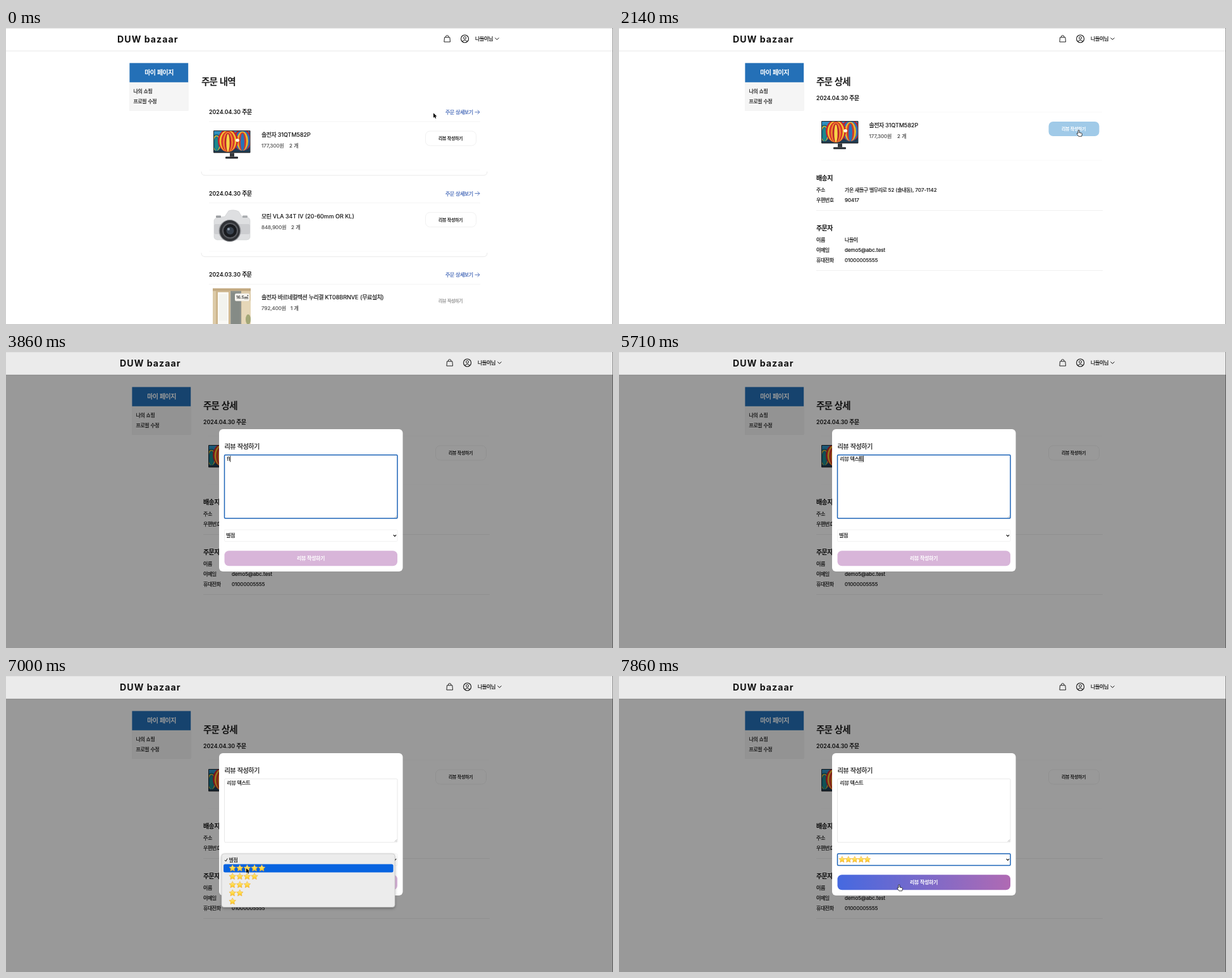
Recreate the animation shown at these times as an HTML page. Size 960 by 468 pixels, loop 8 s.

```html
<!DOCTYPE html>
<html lang="ko">
<head>
<meta charset="utf-8">
<style>
html, body { margin: 0; width: 100%; height: 100%; overflow: hidden; background: #fff; }
svg { display: block; width: 960px; height: 468px; }
text { font-family: Inter, "Noto Sans CJK KR", "Noto Sans CJK JP", "Noto Sans CJK", sans-serif; white-space: pre; }
tspan { letter-spacing: -.06em; }
</style>
</head>
<body>
<svg id="stage" viewBox="0 0 960 468" xmlns="http://www.w3.org/2000/svg"></svg>
<script>
const stage = document.getElementById('stage');

// Hangul runs are set a little tighter than Latin ones.
const hangul = s => s.replace(/[ㄱ-힣]+/g, '<tspan>$&</tspan>');
// A hairline stroke thickens the regular weight to a medium one.
const text = (x, y, s, size = 8, weight = 400, fill = '#111', extra = '') =>
  `<text x="${x}" y="${y}" font-size="${size}" font-weight="${weight}" fill="${fill}" ${extra}
    ${weight < 600 ? `stroke="${fill}" stroke-width=".2"` : ''}>${hangul(s)}</text>`;
const mid = (x, y, s, size, weight, fill) => text(x, y, s, size, weight, fill, 'text-anchor="middle"');
const rect = (x, y, w, h, fill, r = 0, extra = '') =>
  `<rect x="${x}" y="${y}" width="${w}" height="${h}" rx="${r}" fill="${fill}" ${extra}/>`;
const path = (d, stroke = '#111', width = 1, extra = 'fill="none"') =>
  `<path d="${d}" stroke="${stroke}" stroke-width="${width}" ${extra}/>`;
const oval = (x, y, rx, ry, fill) => `<ellipse cx="${x}" cy="${y}" rx="${rx}" ry="${ry}" fill="${fill}"/>`;
const group = (id, body, extra = '') => `<g id="${id}" ${extra}>${body}</g>`;
const at = (x, y, body) => `<g transform="translate(${x} ${y})">${body}</g>`;
const rule = (x, y, w, color = '#f0f0f0') => rect(x, y, w, 1, color);

function star(x, y, r) {
  const points = Array.from({ length: 10 }, (_, i) => {
    const a = i * Math.PI / 5, d = i % 2 ? r * .5 : r;
    return (x + d * Math.sin(a)).toFixed(2) + ',' + (y - d * Math.cos(a)).toFixed(2);
  });
  return `<polygon points="${points.join(' ')}" fill="url(#gold)" stroke="#efab2e" stroke-width=".6" stroke-linejoin="round"/>`;
}
const stars = (n, x, y, gap, r) => Array.from({ length: n }, (_, i) => star(x + i * gap, y, r)).join('');

// Nested ovals share their lowest point, so the stripes fan out upwards.
function balloon(x, y, rx, ry, colors) {
  return colors.map((c, i) => {
    const k = 1 - i / colors.length;
    return oval(x, y + ry * (1 - k) * .25, rx * k, ry * (.75 + k * .25), c);
  }).join('');
}

const monitor =
  rect(0, 0, 58.5, 35.5, '#20252b', 1) +
  '<g clip-path="url(#screen)">' + rect(1, 1, 56.5, 32.5, '#2f8fc0') + rect(1, 26, 56.5, 8, '#1c3d55') +
  balloon(5, 19, 9, 13, ['#14647a', '#d9b72f', '#17748f', '#1b8a8a']) +
  balloon(46, 15, 15, 17, ['#b9252f', '#2b6fb8', '#e9b92b', '#cf3a2c', '#2674b9']) +
  balloon(23, 16, 16, 18, ['#c9252c', '#f4c531', '#d9342b', '#f08b2c', '#b91f2e', '#f7d447']) +
  oval(38, 15.5, 3, 2.5, '#fff8e0') + '</g>' +
  rect(26, 35.5, 7, 6, '#34383d') + rect(19, 41.5, 20, 3, '#22262b', 1);

const camera =
  path('M1 16Q2 12 8 11.5L18 10L24 1Q32-2 40 2L45 10L54 11.5Q58 12 58 17V43Q57 47 52 47H6Q1 46 1 42Z', '#c4c6c8', .5, 'fill="#dedfe1"') +
  rect(1, 22, 57, 16, '#cccdd0', 3) + rect(4, 8.5, 8, 3.5, '#9b9ea1', 1) + rect(46, 8.5, 8, 3.5, '#a9acaf', 1) +
  oval(26, 32.5, 17.5, 17.5, '#909296') + oval(26, 32.5, 16, 16.5, '#303236') +
  oval(26.5, 32.5, 12.5, 12.5, '#595b60') + oval(26.5, 32.5, 10.5, 10.5, '#191b1f') +
  oval(26.5, 32.5, 6, 6, '#37404c') + oval(24, 30, 2, 2, '#8b98a8');

const room =
  rect(0, 0, 60, 57, '#dccaa8') + rect(0, 0, 60, 4, '#c2a981') + rect(5, 4, 22, 53, '#cdb58c') +
  rect(8, 6, 17, 51, '#faf9f5') + rect(10, 9, 13, 42, '#f2f3ee') +
  rect(28, 4, 17, 53, '#8d928c') + rect(30, 7, 13, 50, '#858b86') +
  rect(46, 20, 14, 37, '#e6d7b8') + oval(56, 49, 4, 8, '#a3a777') +
  rect(35, 8, 23, 12, '#f6f4ee', 2) + mid(46.5, 16.6, '16.5㎡', 6.6, 600, '#333');

const arrowRight = (x, y) => path(`M${x} ${y}h7.5m-3.2-3.2l3.2 3.2l-3.2 3.2`, '#4266b5', .9);
const button = (x, y, id = '') =>
  rect(x, y, 80, 23, '#fff', 7, `stroke="#ededed" stroke-width=".8" ${id && `id="${id}"`}`);

function card(y, name, price, count, countX, picture, done) {
  return at(0, y,
    text(321, 136, y < 200 ? '2024.04.30 주문' : '2024.03.30 주문', 8.8, 600) +
    text(695, 136, '주문 상세보기', 8, 400, '#3b60b4') + arrowRight(741.5, 133) +
    rule(321, 147.5, 429, '#f4f4f4') + rule(321, 224, 429, '#f9f9f9') +
    path('M309 227q0 6 6 6h440q6 0 6-6', '#eaeaea') + picture +
    text(404, 172.3, name, 9) + text(404, 189, price, 8, 400, '#555') + text(countX, 189, count, 8, 400, '#444') +
    (done ? '' : button(663.5, 163)) +
    mid(703, 177, '리뷰 작성하기', 7, done ? 400 : 600, done ? '#888' : '#222'));
}

const listPage =
  text(309, 90, '주문 내역', 14.6, 600, '#222') +
  card(0, '솔전자 31QTM582P', '177,300원', '2 개', 448, at(328, 162, monitor)) +
  card(128.6, '모린 VLA 34T IV (20-60mm OR KL)', '848,900원', '2 개', 451, at(328, 159.5, camera)) +
  card(257.2, '솔전자 바르네컬렉션 누리결 KT08BRNVE (무료설치)', '792,400원', '1 개', 450, at(327, 154.5, room), true);

const row = (y, label, value) => text(312, y, label) + text(357, y, value);
const detailPage =
  text(312, 90, '주문 상세', 14.6, 600, '#222') + text(312, 114, '2024.04.30 주문', 8.8, 600) +
  rule(320, 132.5, 444, '#f9f9f9') + at(320, 147, monitor) +
  text(395.5, 157.2, '솔전자 31QTM582P', 9) + text(395.5, 174, '177,300원', 8, 400, '#555') +
  text(440, 174, '2 개', 8, 400, '#444') +
  button(679.5, 148, 'review') + '<g id="reviewLabel">' + mid(719, 162, '리뷰 작성하기', 7, 600, 'inherit') + '</g>' +
  rule(320, 208.5, 444, '#f9f9f9') +
  text(312, 240.5, '배송지', 10, 600) +
  row(258.8, '주소', '가온 새들구 별무리로 52 (솔내동), 707-1142') + row(275, '우편번호', '90417') +
  rule(312, 288, 453) +
  text(312, 319.5, '주문자', 10, 600) +
  row(338, '이름', '나들이') + row(354, '이메일', 'demo5@abc.test') + row(370, '휴대전화', '01000005555') +
  rule(312, 383, 453);

const sidebar =
  rect(195.3, 86, 93, 44.6, '#f5f5f5', 0, 'stroke="#ededed" stroke-width=".5"') +
  rect(195.4, 55.4, 92.8, 30.4, '#2470b7') + mid(242, 74, '마이 페이지', 10, 600, '#fff') +
  text(201.5, 103, '나의 쇼핑') + text(201.5, 119.2, '프로필 수정');

const headerItems =
  text(176, 22.6, 'DUW bazaar', 14.2, 700, '#111', 'letter-spacing="1"') +
  path('M693.5 14.8h8.4l.6 7.2h-9.6zM695.4 14.8v-.8a2.3 2.3 0 0 1 4.6 0v.8', '#222', 1) +
  '<circle cx="725.6" cy="17" r="6" fill="none" stroke="#111" stroke-width="1.1"/>' +
  '<circle cx="725.6" cy="15.6" r="2" fill="none" stroke="#111"/>' +
  path('M721.8 21.2q3.8-4 7.6 0') +
  text(742, 19.9, '나들이님', 8.2) + path('M773.5 15.5l3 3l3-3');

const modalBody =
  rect(337, 122, 290.5, 225, '#fff', 6) + text(345.5, 153, '리뷰 작성하기', 10.2, 500) +
  rect(345.5, 162.7, 273.5, 100.3, '#fff', 1.5, 'id="area"') +
  path('M614.8 262l3.4-3.4M617 262l1.2-1.2', '#888', .6) +
  rect(345.5, 281, 273.5, 18.5, '#fff', 1.5, 'id="select"') +
  group('rating', text(348, 293, '별점')) + group('chosen', stars(5, 352.8, 290.3, 10, 5.2)) +
  path('M612.7 289.2l2.2 2.2l2.2-2.2', '#111', 1.2) +
  rect(345.5, 314.3, 273.5, 24, '#d8b5d9', 7, 'id="submit"') + mid(482, 329.3, '리뷰 작성하기', 8.1, 600, '#fff') +
  rect(0, 164, 7, 10.5, '#c8c8c8', 0, 'id="compose"') + text(349.5, 172, '', 8, 400, '#111', 'id="typed"') +
  rect(0, 164, .8, 10, '#111', 0, 'id="caret"');

const menuBody =
  rect(341, 281, 274, 84.5, '#ececec', 4, 'stroke="#bbb" stroke-width=".6" filter="url(#shadow)"') +
  path('M346 291l1.6 2l2.6-4.4', '#111', 1) + text(352.5, 293.5, '별점') +
  rect(344, 297.5, 268.5, 13, '#0763e0', 2.5, 'id="highlight"') +
  [5, 4, 3, 2, 1].map((n, i) => stars(n, 358.2, 304 + i * 13.1, 11.6, 5.5)).join('');

const hand = path('M-1 5V1q0-1.2 1-1.2t1 1.2v3l3.6.8q1 .3.8 1.5l-.7 3.5h-4.8l-2.8-4q-.4-1.4 1.9-.8z', '#111', .8, 'fill="#fff"');
const arrow = path('M0 0v7.4l1.8-1.6l1.2 2.7l1.3-.6l-1.2-2.6h2.3z', '#fff', .7, 'fill="#000" paint-order="stroke"');
const beam = path('M-2 0q2 0 2 1.2q0-1.2 2-1.2M0 1v7M-2 9q2 0 2-1.2q0 1.2 2 1.2', '#222', .9);

stage.innerHTML =
  `<defs>
    <clipPath id="screen"><rect x="1" y="1" width="56.5" height="32.5"/></clipPath>
    <linearGradient id="gold" x2="0" y2="1"><stop stop-color="#fff0a0"/><stop offset=".6" stop-color="#ffd83c"/><stop offset="1" stop-color="#fbbf2d"/></linearGradient>
    <linearGradient id="active"><stop stop-color="#4569e0"/><stop offset="1" stop-color="#b06ab3"/></linearGradient>
    <filter id="shadow" x="-10%" y="-10%" width="120%" height="130%"><feDropShadow dx="0" dy="2" stdDeviation="2" flood-opacity=".3"/></filter>
  </defs>` +
  rect(0, 0, 960, 468, '#fff') + group('list', listPage) + group('detail', detailPage) + group('side', sidebar) +
  rect(0, 0, 960, 468, '#000', 0, 'id="shade" opacity=".4"') +
  rect(0, 36, 960, 2, '#000', 0, 'opacity=".03"') + rect(0, 0, 960, 36, '#fff', 0, 'id="header"') +
  rule(0, 0, 960, '#e2e2e2') + rect(0, 35.3, 960, .7, '#000', 0, 'opacity=".07"') + group('top', headerItems) +
  rect(959, 0, 1, 468, '#000', 0, 'opacity=".4"') +
  group('modal', modalBody) + group('menu', menuBody) +
  group('mouse', group('arrow', arrow) + group('hand', hand) + group('beam', beam));

const $ = id => document.getElementById(id);
const show = (id, on) => $(id).style.display = on ? '' : 'none';
const set = (id, attrs) => { for (const k in attrs) $(id).setAttribute(k, attrs[k]); };

// [step, x, y], seven steps per second
const track = [[0, 676, 134.5], [4, 721, 131], [8, 724, 134], [10, 724, 134], [15, 727, 161.5], [17, 726, 161.5],
  [18, 712, 166], [19, 570, 195], [20, 445, 206], [21, 433, 203], [43, 433, 203], [45, 415, 250], [47, 400, 290],
  [49, 380, 304], [52, 380, 305], [53, 398, 314], [54, 430, 327], [55, 443, 330]];
const keys = [[0, ''], [26, 'f'], [27, 'fl'], [29, 'f'], [30, ''], [32, 'ㄹ'], [33, '리'], [34, '립'], [35, '리뷰'],
  [36, '리뷰 '], [37, '리뷰 테'], [38, '리뷰 텍ㅅ'], [39, '리뷰 텍슽'], [40, '리뷰 텍스트']];

function pointer(n) {
  const i = Math.max(1, track.findIndex(p => p[0] >= n));
  const [a, x, y] = track[i - 1], [b, u, v] = track[i];
  const k = (n - a) / (b - a);
  return [x + (u - x) * k, y + (v - y) * k];
}

function draw(n) {
  const within = (a, b) => n >= a && n < b;
  const detail = n >= 6, modal = n >= 16, chosen = n >= 52;
  show('list', !detail);
  show('detail', detail);
  for (const id of ['top', 'side']) set(id, { transform: `translate(${detail ? 4 : 0} 0)` });
  show('shade', modal);
  show('modal', modal);
  set('header', { fill: modal ? '#ebebeb' : '#fff' });

  const hover = within(14, 18);
  set('review', { fill: hover ? '#a0cae8' : modal ? 'none' : '#fff', stroke: hover ? 'none' : '#ededed' });
  set('reviewLabel', { fill: hover ? '#fff' : '#222' });

  const focus = within(21, 46);
  set('area', { stroke: focus ? '#1d64b8' : n < 21 ? '#f5f5f5' : '#e2e2e2', 'stroke-width': focus ? 1.5 : .8 });
  set('select', { stroke: chosen ? '#1d64b8' : '#efefef', 'stroke-width': chosen ? 1.5 : .8 });
  set('submit', { fill: chosen ? 'url(#active)' : '#d8b5d9' });
  show('rating', !chosen);
  show('chosen', chosen);

  const typed = keys.filter(k => k[0] <= n).pop()[1];
  $('typed').innerHTML = hangul(typed);
  const end = 349.5 + (typed && modal ? $('typed').getComputedTextLength() : 0);
  set('caret', { x: end });
  set('compose', { x: end - 7.3 });
  show('caret', focus && !within(24, 26));
  show('compose', within(32, 43) && /[ㄱ-힣]$/.test(typed));

  show('menu', within(47, 52));
  show('highlight', within(48, 51));

  const [x, y] = pointer(n);
  const overText = within(20, 26) || within(44, 46);
  const overButton = within(3, 16) || n >= 54;
  set('mouse', { transform: `translate(${x} ${y})` });
  show('mouse', !within(26, 44));
  show('beam', overText);
  show('hand', overButton);
  show('arrow', !overText && !overButton);
}

function tick() {
  draw(Math.min(55, Math.floor((performance.now() % 8000 + 5) * .007)));
  requestAnimationFrame(tick);
}
tick();
</script>
</body>
</html>
```
